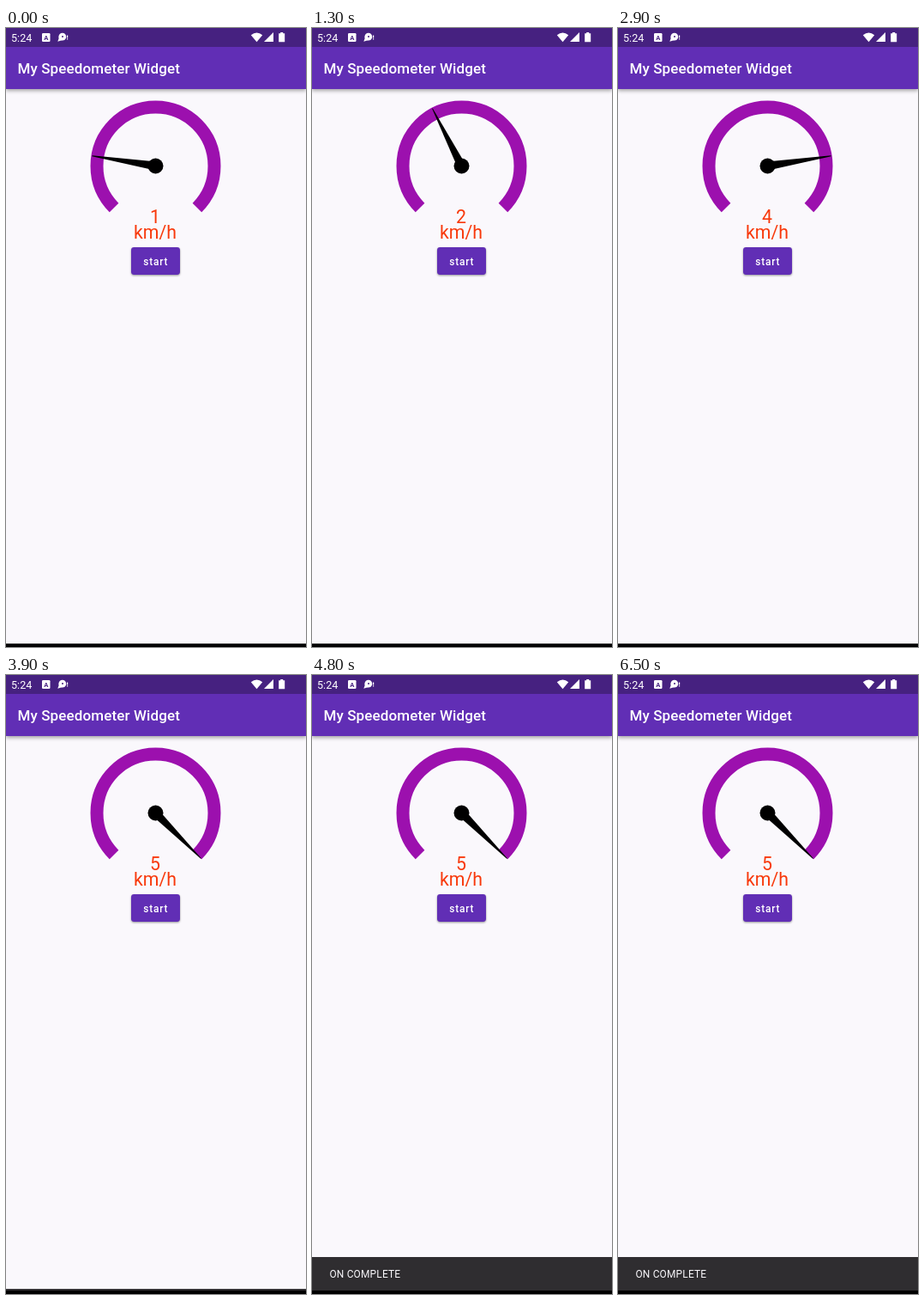
Recreate the animation shown at these times as an HTML page. Size 350 by 720 pixels, loop 6.6 s.

```html
<!DOCTYPE html>
<html lang="en">
<head>
<meta charset="utf-8">
<title>Speedometer</title>
<style>
  html, body { margin: 0; width: 100%; height: 100%; overflow: hidden; background: #faf8fc; }
  svg { display: block; font-family: Roboto, sans-serif; }
  .bar { filter: drop-shadow(0 2px 2px rgba(0, 0, 0, .35)); }
  .button { filter: drop-shadow(0 1.4px 1.1px rgba(0, 0, 0, .4)); }
  .speed { font-size: 21.3px; fill: #f8390b; text-anchor: middle; }
</style>
</head>
<body>
<svg width="350" height="720" viewBox="0 0 350 720">
  <rect width="350" height="720" fill="#faf8fc"/>

  <g class="bar">
    <rect width="350" height="71" fill="#612eb5"/>
  </g>
  <rect width="350" height="22" fill="#462180"/>

  <g fill="#fff">
    <text x="6" y="15.6" font-size="12.6">5:24</text>
    <rect x="42" y="6" width="9.5" height="10" rx="1.2"/>
    <text x="46.8" y="13.8" font-size="7.6" font-weight="700" text-anchor="middle" fill="#462180">A</text>
    <circle cx="65.8" cy="10.2" r="4.4"/>
    <path d="M62 11L60.3 15.8L66 14Z"/>
    <circle cx="66" cy="10" r="1" fill="#462180"/>
    <path d="M71 8.5h1.2v3H71zM71 12.3h1.2v1.1H71z"/>
    <path d="M285.8 8.2Q292.5 2.8 299.2 8.2L292.5 16.2Z"/>
    <path d="M312 5V16H301Z"/>
    <path d="M318.2 6.3h2V5h3v1.3h2V16.2h-7z"/>
  </g>
  <text x="13.4" y="53.2" font-size="17" font-weight="500" letter-spacing=".13" fill="#fff">My Speedometer Widget</text>

  <g transform="translate(174.5 160.5)">
    <path id="dial" fill="none" stroke="#9c10ae" stroke-width="15"/>
    <path id="needle" d="M0 -5L75 -.4V.4L0 5Z"/>
    <circle r="9"/>
  </g>
  <text id="digit" class="speed" x="174" y="226.6"></text>
  <text class="speed" x="174" y="244.6">km/h</text>

  <g class="button">
    <rect x="146" y="255" width="57" height="32" rx="3.4" fill="#612eb5"/>
  </g>
  <text x="160.2" y="275.6" font-size="11.9" font-weight="500" letter-spacing=".85" fill="#fff">start</text>

  <g id="snack">
    <rect y="677" width="350" height="41" fill="#2f2d30"/>
    <text id="note" x="20.4" y="701" font-size="11.9" letter-spacing=".21" fill="#faf8fc">ON COMPLETE</text>
  </g>
  <rect y="716" width="350" height="4"/>
</svg>
<script>
  const LOOP = 6600, TICK = 100;
  const SNACK_AT = 3900, SNACK_HEIGHT = 39;
  const RISE = [.05, .85, 1];
  const FADE = [0, 0, .93, 1];

  const el = id => document.getElementById(id);
  const [dial, needle, digit, snack, note] = ['dial', 'needle', 'digit', 'snack', 'note'].map(el);
  const at = (list, i) => i < 0 ? 0 : list[Math.min(i, list.length - 1)];

  const edge = 68.5 * Math.SQRT1_2;
  dial.setAttribute('d', `M${-edge} ${edge}A68.5 68.5 0 1 1 ${edge} ${edge}`);

  function draw(time) {
    const t = Math.floor(time % LOOP / TICK) * TICK;

    // One unit per second, 54 degrees each
    const speed = Math.min(5, 1 + Math.floor((t + TICK) / 1000));
    needle.setAttribute('transform', `rotate(${135 + 54 * speed})`);
    digit.textContent = speed;

    const step = (t - SNACK_AT) / TICK;
    snack.setAttribute('transform', `translate(0 ${SNACK_HEIGHT * (1 - at(RISE, step))})`);
    snack.setAttribute('visibility', step < 0 ? 'hidden' : 'visible');
    note.setAttribute('opacity', at(FADE, step));
  }

  function frame() {
    draw(performance.now());
    requestAnimationFrame(frame);
  }
  frame();
</script>
</body>
</html>
```
